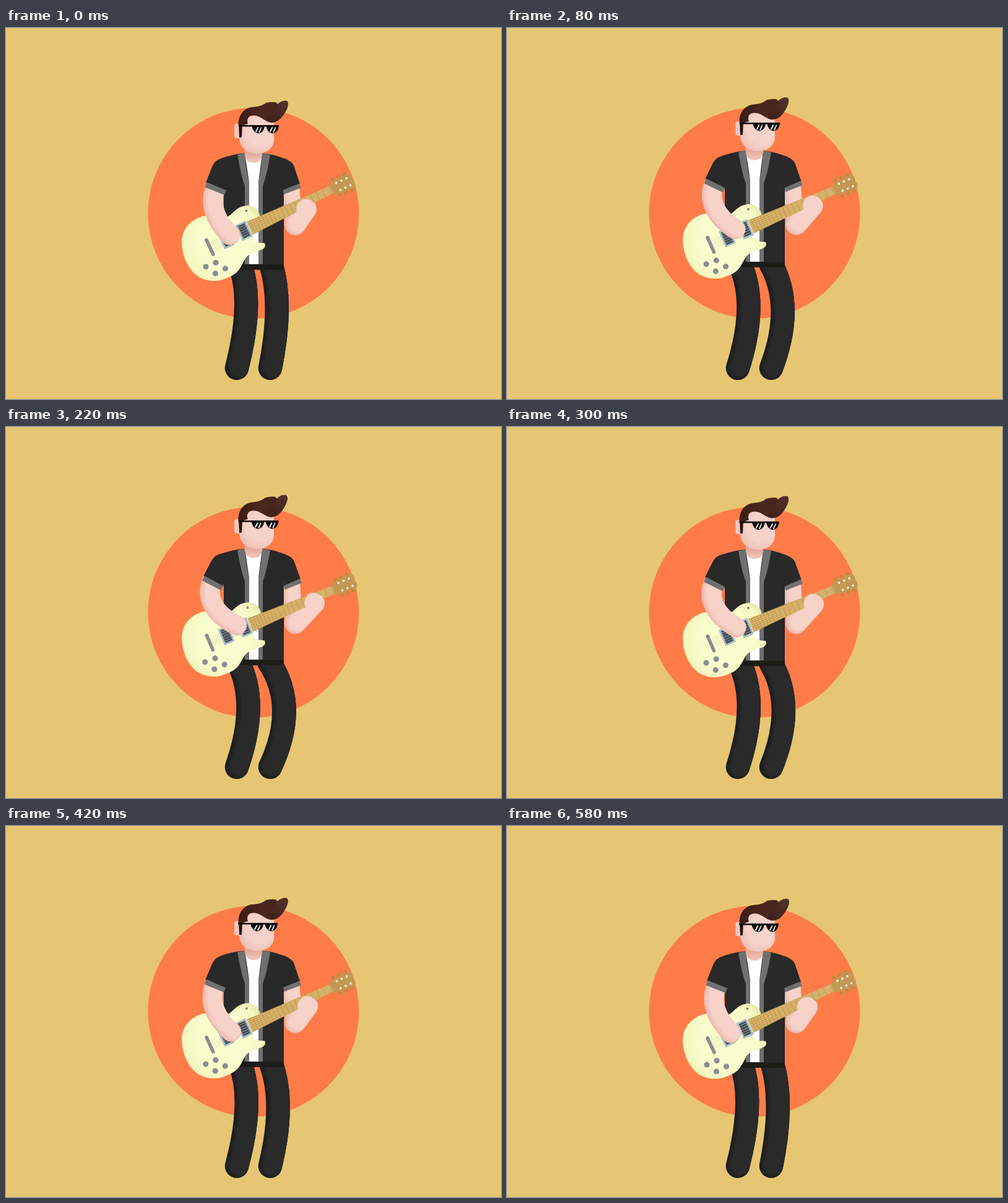
An HTML page that plays this animation: 800 px wide and 600 px high, repeating every 600 ms.

```html
<!DOCTYPE html>
<html lang="en">
<head>
<meta charset="utf-8">
<title>Guitarist</title>
<style>
  html, body { margin: 0; width: 100%; height: 100%; overflow: hidden; background: #e6c672; }
  svg { display: block; width: 800px; height: 600px; }
  .limb path { fill: none; stroke-linecap: round; stroke-linejoin: round; }
</style>
</head>
<body>
<svg viewBox="0 0 800 600">
  <defs>
    <radialGradient id="wood" gradientUnits="userSpaceOnUse" cx="352" cy="346" r="74">
      <stop offset=".55" stop-color="#f9fccd"/>
      <stop offset=".85" stop-color="#f5f8c2"/>
      <stop offset="1" stop-color="#e8e8aa"/>
    </radialGradient>
    <radialGradient id="skin" gradientUnits="userSpaceOnUse" cx="412" cy="168" r="44">
      <stop offset=".5" stop-color="#f6d3ca"/>
      <stop offset="1" stop-color="#ecbaae"/>
    </radialGradient>
    <linearGradient id="neckSkin" x1="0" y1="0" x2="0" y2="1">
      <stop offset=".3" stop-color="#e3a89c"/>
      <stop offset="1" stop-color="#f2c8be"/>
    </linearGradient>
    <linearGradient id="hairTone" x1="0" y1="0" x2="1" y2="0">
      <stop offset="0" stop-color="#3a1c14"/>
      <stop offset=".45" stop-color="#4c271e"/>
      <stop offset="1" stop-color="#43241c"/>
    </linearGradient>
    <linearGradient id="quiffTone" x1="0" y1="1" x2=".6" y2="0">
      <stop offset="0" stop-color="#3d2019"/>
      <stop offset="1" stop-color="#52302a"/>
    </linearGradient>
  </defs>

  <circle cx="400" cy="299.700" r="170.600" fill="#ff7c48"/>
  <g id="legL" class="limb"></g>
  <g id="legR" class="limb"></g>
  <g id="upperArm" class="limb"></g>
  <g id="foreArm" class="limb"></g>

  <g id="torso">
    <path d="M386 202.500C368 204 354 208 343 213L352 230V391H449V230L462 218C448 209 432 204 414 202.500Z" fill="#292929"/>
    <path d="M386 203H414L408 250V382H393V250Z" fill="#fff"/>
    <path d="M374 205L386 202.500Q388 232 393 250V382H386V255Q380 240 374 205Z
             M427 205L414 202.500Q412 232 408 250V382H415V255Q421 240 427 205Z" fill="#707070"/>
    <path d="M353 382.500H449V391H353Z" fill="#1b1c18"/>
    <path d="M386 195H414V205Q412 218 400 218Q387 217 386 205Z" fill="url(#neckSkin)"/>
    <g id="sleeveR">
      <path d="M448 210Q461 215 465 222L475 252L448 263V220Z" fill="#292929"/>
      <path d="M448 262L474 251.500L477 258.500L449 269Z" fill="#707070"/>
    </g>
  </g>

  <g id="guitar">
    <path d="M284 345C285 325 298 311 316 305C334 301 346 309 358 305C368 301 371 288 391 287C403 288 411 297 411 309
             C411 322 396 331 399 340C403 349 412 347 418 348Q421 354 415 357.500C406 362 394 364 388 371
             C383 378 381 386 374 394C367 401 358 404 350 407C336 411 321 409 309 401C292 388 284 365 284 345Z" fill="url(#wood)"/>
    <circle cx="388.500" cy="295.500" r="2" fill="#8b8672"/>
    <g id="knobs" fill="#8a8d94"></g>
    <g id="neck" transform="translate(391 325) rotate(-25.2)"></g>
  </g>

  <circle id="hand" r="16" fill="#f6d2c9"/>
  <g id="arm" class="limb"></g>
  <g id="shoulder">
    <g id="sleeveL">
      <path d="M358 207.500Q347 211 342 213.500Q336 217 332.500 226L323 250L356 264L364 225Z" fill="#292929"/>
      <path d="M324.500 249.500L356 262.500L353 270L321.500 257.500Z" fill="#707070"/>
    </g>
  </g>

  <g id="head">
    <rect x="369" y="155" width="12" height="23" rx="4" fill="#f2c8be"/>
    <path d="M377 150V178C378 194 390 203 405 203C421 203 433 195 433 180V140H382Z" fill="url(#skin)"/>
    <path d="M376 155H382L381 177H377Z" fill="#2b130d"/>
    <g id="hair">
      <path d="M376 160C374 143 383 130 397 128C408 127 414 126 420 121Q428 119 436 120L439 123C444 118 450 117 454 118
               C458 121 455 131 450 138C445 146 439 153 428 153C417 151 412 142 401 141.500C393 141 388 146 391 155
               Q384 156 382 160Z" fill="url(#hairTone)"/>
      <path d="M439 123C444 118 450 117 454 118C458 121 455 131 450 138C445 146 439 153 429 152.500C421 150 420 143 427 139
               Q437 135 439 123Z" fill="url(#quiffTone)"/>
    </g>
    <g id="glasses">
      <path d="M377 157H441V159.500H377Z" fill="#0c0a0a"/>
      <g id="lens">
        <path d="M397 157.500H418Q417 170 407 170.500Q399 169 397 157.500Z" fill="#0c0a0a"/>
        <path d="M403 167.500L406.500 160.500H408.500L404.500 168.800ZM408 169.300L412 160.500H413.500L410 169.300Z" fill="#fff"/>
      </g>
      <use href="#lens" x="23"/>
    </g>
  </g>
</svg>

<script>
const $ = id => document.getElementById(id);
const range = (n, f) => Array.from({ length: n }, (_, i) => f(i)).join('');
const rect = (x, y, w, h, fill, rx = 0) =>
  `<rect x="${x}" y="${y}" width="${w}" height="${h}" fill="${fill}" rx="${rx}"/>`;
const dot = (x, y, r, fill) => `<circle cx="${x}" cy="${y}" r="${r}" fill="${fill}"/>`;

// Guitar parts, with x running along the strings
const pickup = x => rect(x, -14, 18, 28, '#a8bdc8') + rect(x + 3, -11, 12, 22, '#454b50') +
  range(5, i => rect(x + 3, -8.5 + i * 4, 12, 1, '#8496a0'));

$('knobs').innerHTML = [[339, 379.5], [323, 386], [354.5, 389], [338.5, 397]]
  .map(([x, y]) => `<circle cx="${x}" cy="${y}" r="4.6"/>`).join('');

$('neck').innerHTML =
  range(6, i => rect(-68, -7 + i * 2.8, 66, 0.7, '#dcdeb4')) +
  pickup(-48) + pickup(-16) +
  rect(-71, -13, 5.5, 29, '#8d8c8c', 2.5) + dot(-68.2, -12, 3, '#85878c') +
  range(3, i => dot(158 + i * 10.5, -14, 3, '#b58d43') + dot(158 + i * 10.5, 14, 3, '#b58d43')) +
  '<path d="M144 -6.500Q150 -7 155 -10.500L184 -13Q190 -8 187 0Q190 8 184 13L155 10.500Q150 7 144 6.500Z" fill="#c29852"/>' +
  '<path d="M3 -11.500L148 -6.500V6.500L3 11.500Z" fill="#cfa75b"/>' +
  range(19, i => {
    const x = 147 - 144 * (1 - 0.95 ** i) / (1 - 0.95 ** 19);
    const h = 6.4 + (147 - x) * 0.033;
    return rect(x, -h, 1, h * 2, '#b0863f');
  }) +
  range(6, i => {
    const k = i - 2.5;
    return `<path d="M3 ${k * 3.4}L150 ${k * 2.1}" stroke="#e3c98c" stroke-width=".7"/>`;
  }) +
  range(3, i => dot(161 + i * 9, -6.5, 1.9, '#f4eccd') + dot(162 + i * 9, 6.5, 1.9, '#f4eccd'));

// A limb is three nested strokes, giving a soft shade along its left edge
const limbs = {};
function limb(id, width, colours, from, to, shape) {
  $(id).innerHTML = colours.map((c, i) =>
    `<path stroke="${c}" stroke-width="${width - i * 4}" transform="translate(${i * 1.9} ${-i * 0.5})"/>`).join('');
  limbs[id] = { paths: [...$(id).children], from, to, shape };
}
const cloth = ['#1e1e1e', '#242424', '#2a2a2a'];
const skin = ['#eebdb1', '#f3c9bf', '#f6d2c9'];
const quad = p => `M${p[0]} ${p[1]}Q${p[2]} ${p[3]} ${p[4]} ${p[5]}`;
const line = p => `M${p[0]} ${p[1]}L${p[2]} ${p[3]}`;
const cubic = p => `M${p[0]} ${p[1]}C${p.slice(2).join(' ')}`;

limb('legL', 38.6, cloth, [379, 385, 400, 444, 373, 550], [375, 380, 409, 447, 373, 550], quad);
limb('legR', 38.6, cloth, [429, 385, 447.5, 448, 427, 550], [425, 380, 473, 452, 427, 550], quad);
limb('upperArm', 28, skin, [460, 258, 465, 314], [461, 252, 465, 313], line);
limb('foreArm', 35, skin, [467.5, 317.5, 484.5, 293], [467.5, 317, 497.5, 285], line);
limb('arm', 32, skin, [339, 257, 328, 283, 337, 310, 362, 335],
  [333, 249, 322, 275, 335, 302, 373, 321], cubic);

const mix = (a, b, u) => a + (b - a) * u;
const place = (id, value) => $(id).setAttribute('transform', value);

// 0 = low pose, 1 = high pose: a quick rise, then an eased fall
function lift(t) {
  if (t < 210) return 1 - (1 - t / 230) ** 2.6;
  const p = Math.min(1, (t - 210) / 285);
  return 0.5 + 0.5 * Math.cos(Math.PI * p);
}

function draw(t) {
  const u = lift(t);
  for (const { paths, from, to, shape } of Object.values(limbs)) {
    const d = shape(from.map((a, i) => mix(a, to[i], u)));
    paths.forEach(p => p.setAttribute('d', d));
  }
  const up = `translate(0 ${-5.8 * u})`;
  place('torso', up);
  place('shoulder', up);
  place('head', `translate(0 ${-6 * u})`);
  place('sleeveL', `rotate(${6 * u} 352 212)`);
  place('sleeveR', `rotate(${-1.5 * u} 455 215)`);
  place('hair', `rotate(${-1.7 * u} 392 160)`);
  const slip = Math.min(1, Math.max(0, (t - 120) / 280));
  place('glasses', `translate(${-2 * slip} ${0.7 * slip})`);
  place('guitar', `translate(0 ${-5 * u}) rotate(${2.1 * u} 350 350)`);
  place('hand', `translate(${mix(485, 498.5, u)} ${mix(292.5, 284.5, u)})`);
}

const LOOP = 600, STEP = 20;
const start = performance.now();
function tick() {
  const t = (performance.now() - start) % LOOP;
  draw(Math.floor(t / STEP) * STEP);
  requestAnimationFrame(tick);
}
tick();
</script>
</body>
</html>
```
